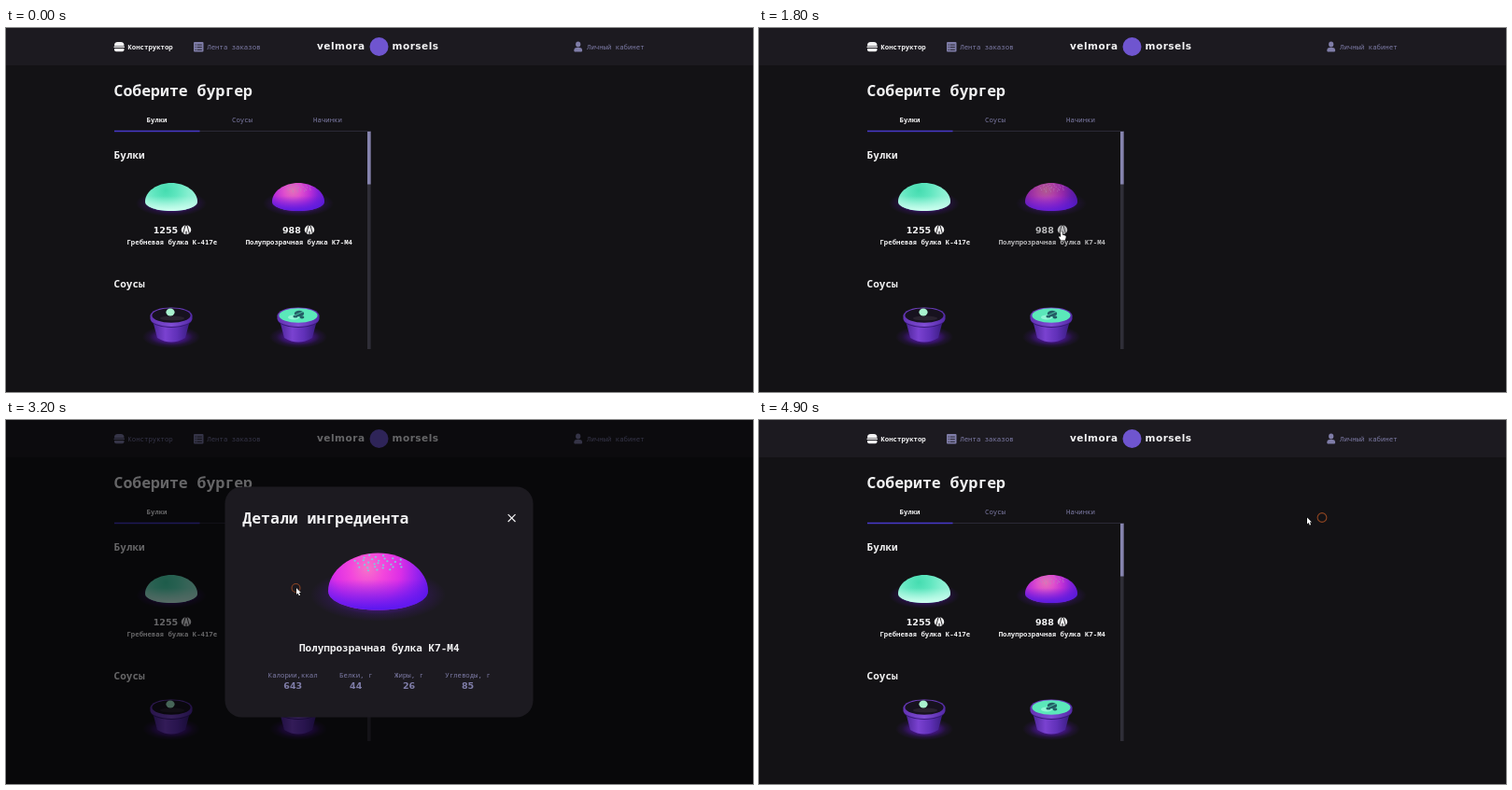
Write an HTML page with a canvas that moves like this. It is 800 px wide and 390 px high and loops after 5 s.

```html
<!DOCTYPE html>
<html lang="ru">
<head>
<meta charset="utf-8">
<title>Конструктор</title>
<style>
  html, body { margin: 0; width: 100%; height: 100%; overflow: hidden; background: #131215; }
  canvas { display: block; width: 800px; height: 390px; }
</style>
</head>
<body>
<canvas id="stage"></canvas>
<script>
const W = 800, H = 390, LOOP = 5000, STEP = 100;
const OPEN = 3000, CLOSE = 4800;
const MONO = '"Noto Sans Mono", "DejaVu Sans Mono", monospace';
const WIDE = '"DejaVu Sans", sans-serif';
const BG = '#131215', PANEL = '#1c1a20', WHITE = '#f2f2f3', MUTED = '#7f7da8';
const BUN = 'Полупрозрачная булка K7-M4';

const canvas = document.getElementById('stage');
const dpr = window.devicePixelRatio || 1;
canvas.width = W * dpr;
canvas.height = H * dpr;
const c = canvas.getContext('2d');

// Pointer path: time, x, y
const path = [
  [100, 563.5, 163], [1200, 563.5, 163], [1700, 324, 218], [2200, 324, 218],
  [2700, 311, 180], [3300, 311, 180], [3600, 500, 112], [3800, 594, 83.5],
  [4100, 603.5, 104.5], [4700, 603.5, 104.5], [4900, 587, 104.5]
];
const clicks = [[OPEN, 310.5, 180], [CLOSE, 603, 104.5]];

function text(str, x, y, size, color, weight = 500, align = 'left', family = MONO) {
  c.font = `${weight} ${size}px ${family}`;
  c.fillStyle = color;
  c.textAlign = align;
  c.fillText(str, x, y);
}

const small = (str, x, y, color, align) =>
  text(str, x, y, 7.33, color, color === WHITE ? 600 : 500, align);
const digits = (str, x, y, color) => text(str, x, y, 9.5, color, 700, 'left', WIDE);

function rect(x, y, w, h, color, r = 0) {
  c.fillStyle = color;
  c.beginPath();
  c.roundRect(x, y, w, h, r);
  c.fill();
}

function oval(x, y, rx, ry, color) {
  c.fillStyle = color;
  c.beginPath();
  c.ellipse(x, y, rx, ry, 0, 0, Math.PI * 2);
  c.fill();
}

function line(color, width, ...pts) {
  c.strokeStyle = color;
  c.lineWidth = width;
  c.beginPath();
  pts.forEach(([x, y], i) => i ? c.lineTo(x, y) : c.moveTo(x, y));
  c.stroke();
}

function at(x, y, sx, sy, draw) {
  c.save();
  c.translate(x, y);
  c.scale(sx, sy);
  draw();
  c.restore();
}

function stops(g, colors) {
  colors.forEach((col, i) => g.addColorStop(i / (colors.length - 1), col));
  return g;
}

const ramp = (x0, y0, x1, y1, colors) => stops(c.createLinearGradient(x0, y0, x1, y1), colors);
const spot = (x, y, r, colors) => stops(c.createRadialGradient(x, y, 0, x, y, r), colors);

function glow(x, y, rx, ry, alpha) {
  at(x, y, rx, ry, () => {
    const tone = k => `rgba(88,22,180,${alpha * k})`;
    oval(0, 0, 1, 1, spot(0, 0, 1, [tone(1), tone(0.95), tone(0.8), tone(0.25), tone(0)]));
  });
}

function bun(x, y, sx, sy, light, shade, seeds) {
  at(x, y, sx, sy, () => {
    glow(0, 7, 38, 14, 0.75);
    c.beginPath();
    c.moveTo(-28, 5);
    c.bezierCurveTo(-28, -6, -15, -15, 0, -15);
    c.bezierCurveTo(15, -15, 28, -6, 28, 5);
    c.bezierCurveTo(28, 11, 15, 15, 0, 15);
    c.bezierCurveTo(-15, 15, -28, 11, -28, 5);
    c.fillStyle = spot(-6, -7, 37, light);
    c.fill();
    c.fillStyle = ramp(0, -1, 0, 15, shade);
    c.fill();
    if (!seeds) return;
    for (let i = 0; i < 30; i++) {
      const a = i * 2.4, r = Math.sqrt(i / 30);
      oval(Math.cos(a) * r * 15, -9.7 + Math.sin(a) * r * 4.5, 0.6, 0.5, seeds);
    }
  });
}

const mintBun = () => bun(177, 181, 1, 1,
  ['#45dcb0', '#5fe6bf', '#86efd0', '#9ff3dc'], ['#cffff000', '#cffff0']);
const pinkBun = () => bun(313, 181, 1, 1,
  ['#e274b6', '#df4fcd', '#bd2fd6', '#7f20d8', '#5a1ad0'], ['#5a1be000', '#5a1be0'], '#b783c4');
const bigBun = () => bun(398.5, 173, 1.91, 2.04,
  ['#f574c8', '#f347dc', '#dd2fe6', '#9a22ee', '#5c16e8'], ['#5a17f000', '#5a17f0'], '#83c6dc');

function pot(x, sauce) {
  at(x, 309, 1, 1, () => {
    glow(0, 22, 31, 12, 0.75);
    c.beginPath();
    c.moveTo(-19.5, 6);
    c.lineTo(-15, 23);
    c.quadraticCurveTo(0, 32, 15, 23);
    c.lineTo(19.5, 6);
    c.closePath();
    c.fillStyle = ramp(-19, 0, 19, 0, ['#4f279c', '#7a42d0', '#6030b8', '#3c1e84']);
    c.fill();
    const rim = ramp(-23, 0, 23, 0, ['#6233b2', '#7f4cd4', '#5229a4']);
    oval(0, 3.5, 22, 8.5, '#39197c');
    oval(0, 2, 22.6, 8.9, rim);
    oval(0, -0.6, 22.6, 9, rim);
    oval(0, -1, 20.6, 7.7, sauce);
  });
}

function pots() {
  pot(177, '#17121f');
  oval(178, 311, 13, 2.6, '#29222f');
  oval(176, 304.5, 4.6, 4, '#a9f2cf');
  pot(313, '#5be8ba');
  oval(308, 310, 6, 2.5, '#91f7d6');
  oval(314, 306, 5.2, 3.2, '#245e66');
  oval(310, 309, 2.6, 1.5, '#245e66');
  oval(317, 310, 2.4, 1.4, '#245e66');
  line('#5be8ba', 0.7, [309, 308], [318, 304]);
}

function coin(x, y) {
  oval(x, y, 5.2, 5, WHITE);
  line(BG, 0.9, [x - 3.6, y + 4.8], [x - 0.9, y - 5], [x + 0.9, y - 5], [x + 3.6, y + 4.8]);
  line(BG, 1.1, [x, y + 1.5], [x, y + 5.2]);
}

function card(x, price, px, name, draw) {
  draw();
  digits(price, px, 220, WHITE);
  coin(x + (price.length > 3 ? 16 : 12), 216.3);
  small(name, x + 0.8, 231.8, WHITE, 'center');
}

function header(active) {
  const tone = active ? WHITE : MUTED;
  rect(0, 0, W, 40, PANEL);
  rect(116, 15, 10.5, 4, tone, [4, 4, 0.5, 0.5]);
  rect(115.5, 19.6, 11.5, 1.5, tone, 0.7);
  rect(116, 21.9, 10.5, 3.4, tone, [0.5, 0.5, 2, 2]);
  small('Конструктор', 130.4, 22.7, tone);
  rect(201, 15, 10.5, 10.5, MUTED, 1);
  for (let y = 17.6; y < 24; y += 2.6) {
    rect(202.6, y, 1, 0.9, PANEL);
    rect(204.6, y, 5.2, 0.9, PANEL);
  }
  small('Лента заказов', 215.3, 22.7, MUTED);
  c.letterSpacing = '0.5px';
  text('velmora', 333, 23, 10.5, WHITE, 700, 'left', WIDE);
  text('morsels', 413.5, 23, 10.5, WHITE, 700, 'left', WIDE);
  c.letterSpacing = '0px';
  oval(399.5, 20, 10, 10, '#6f55cf');
  oval(612.7, 17.5, 2.6, 2.9, MUTED);
  rect(608.3, 21, 8.8, 4.4, MUTED, [3, 3, 0.8, 0.8]);
  small('Личный кабинет', 622, 22.7, MUTED);
}

function page(open, hover) {
  rect(0, 0, W, H, BG);
  header(!open);
  text('Соберите бургер', 115.5, 73.2, 16.5, WHITE, 600);
  small('Булки', 161.5, 100.7, WHITE, 'center');
  small('Соусы', 253, 100.7, MUTED, 'center');
  small('Начинки', 344.5, 100.7, MUTED, 'center');
  rect(207, 110, 184, 1, '#2b2936');
  rect(116, 109.8, 91.5, 1.4, '#4839cb');
  rect(387, 111, 3.6, 233, '#2f2e37');
  rect(387, 111, 3.6, 56.5, '#8583ad');
  text('Булки', 115.6, 140.2, 11, WHITE, 600);
  text('Соусы', 115.6, 278.2, 11, WHITE, 600);
  card(177, '1255', 157.7, 'Гребневая булка K-417e', mintBun);
  c.globalAlpha = hover ? 0.75 : 1;
  card(313, '988', 296, BUN, pinkBun);
  c.globalAlpha = 1;
  pots();
}

function modal() {
  rect(0, 0, W, H, 'rgba(0,0,2,0.58)');
  rect(234.5, 71.5, 330, 247, PANEL, 18);
  text('Детали ингредиента', 253.3, 110.7, 16.5, WHITE, 600);
  line(WHITE, 1.2, [537.7, 101.2], [545.5, 109]);
  line(WHITE, 1.2, [545.5, 101.2], [537.7, 109]);
  bigBun();
  text(BUN, 399.7, 248.2, 11, WHITE, 600, 'center');
  const facts = [
    ['Калории,ккал', 307.2, '643'], ['Белки, г', 374.7, '44'],
    ['Жиры, г', 431.5, '26'], ['Углеводы, г', 494.5, '85']
  ];
  for (const [label, x, value] of facts) {
    small(label, x, 275.6, MUTED, 'center');
    digits(value, x - value.length * 3.3, 287.7, MUTED);
  }
}

function pointer(t) {
  const i = path.findIndex(p => p[0] >= t);
  if (t < path[0][0] || i < 0) return null;
  const b = path[i], a = path[Math.max(0, i - 1)];
  const k = b === a ? 1 : (t - a[0]) / (b[0] - a[0]);
  const e = k * k * (3 - 2 * k);
  return { x: a[1] + (b[1] - a[1]) * e, y: a[2] + (b[2] - a[2]) * e };
}

function shape(x, y, d) {
  at(x, y, 1, 1, () => {
    const p = new Path2D(d);
    c.strokeStyle = '#000';
    c.lineWidth = 0.9;
    c.stroke(p);
    c.fillStyle = '#fff';
    c.fill(p);
  });
}

const arrow = (x, y) => shape(x, y, 'M0 0V6.9L1.6 5.5L2.8 8.2L4.1 7.6L2.9 5H5Z');
const hand = (x, y) => shape(x, y,
  'M-.9 .6Q0-.6 .9 .6V3.6L4 4.5Q5 4.9 4.7 6.2L3.8 9.4H-.7L-2.9 6.2Q-3 5-2 5.2L-.9 6.1Z');

function ring(t, [start, x, y]) {
  const age = t - start;
  if (age < 0 || age > 1000) return;
  c.strokeStyle = `rgba(176,82,36,${0.85 - age * 0.0005})`;
  c.lineWidth = 1.1;
  c.beginPath();
  c.arc(x, y, 5.3 - age * 0.0042, 0, Math.PI * 2);
  c.stroke();
}

function draw(t) {
  c.setTransform(dpr, 0, 0, dpr, 0, 0);
  const open = t >= OPEN && t < CLOSE;
  const p = pointer(t);
  const hover = !open && p && p.x > 250 && p.x < 378 && p.y > 148 && p.y < 240;
  page(open, hover);
  if (open) modal();
  clicks.forEach(click => ring(t, click));
  if (p) (hover ? hand : arrow)(p.x, p.y);
}

const begin = performance.now();
function tick() {
  const t = (performance.now() - begin) % LOOP;
  draw(Math.floor(t / STEP) * STEP);
  requestAnimationFrame(tick);
}
tick();
</script>
</body>
</html>
```
